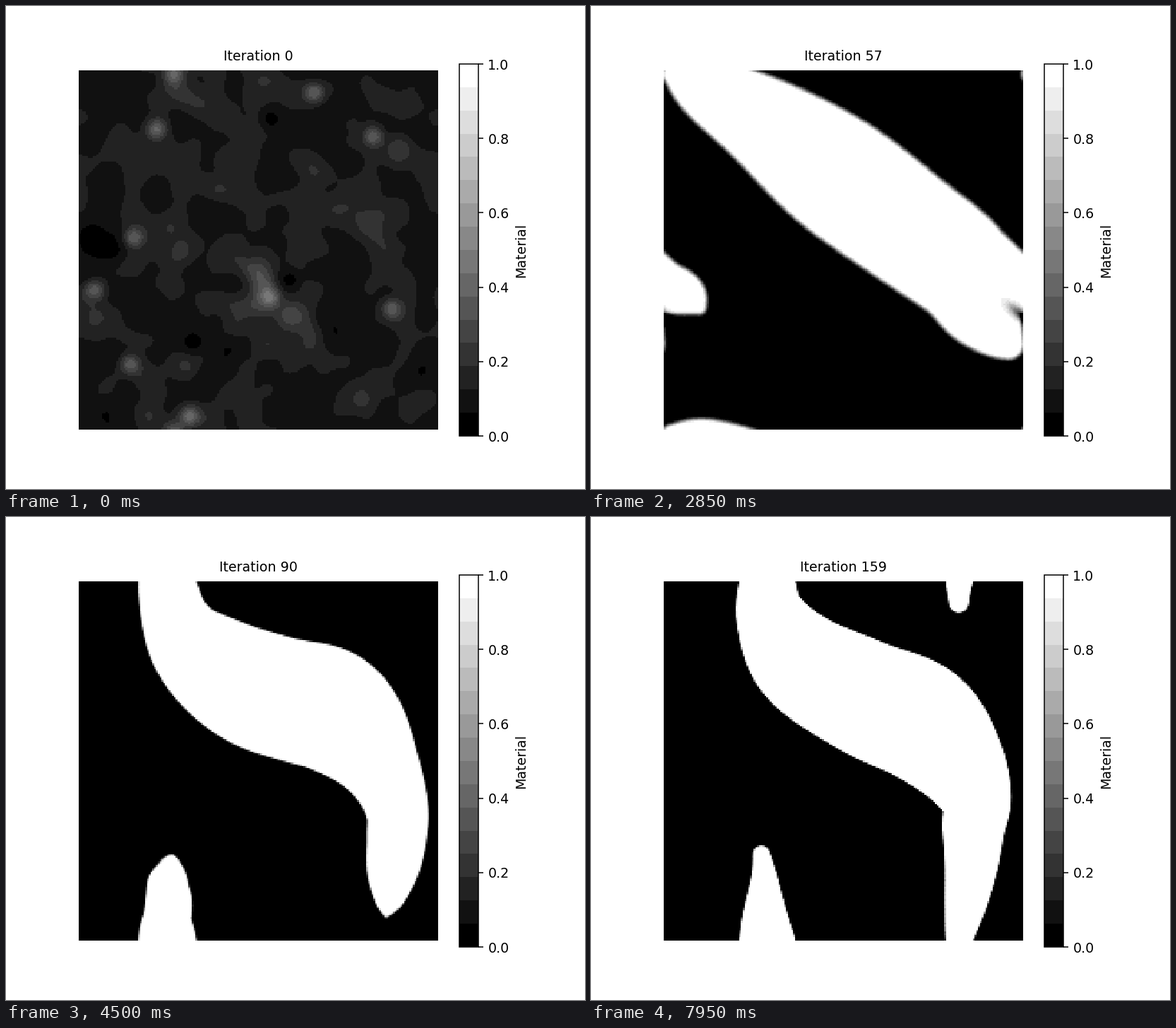
These frames come from a looping animation (820 px wide and 683 px high, 8 s). A matplotlib script:

```python
import matplotlib.pyplot as plt
import numpy as np
from matplotlib.animation import FuncAnimation

W, H, DPI = 820, 683, 820 / 6
FRAMES, STEP = 160, 50
N, SIDE = 200, 508              # grid cells, side of the periodic domain in px
X0, Y0 = 103, 91

axis = (np.arange(N) + 0.5) * SIDE / N
X, Y = np.meshgrid(X0 + axis, Y0 + axis)


def offset(x, y):
    """Shortest way from (x, y) to every cell on the torus."""
    half = SIDE / 2
    return (X - x + half) % SIDE - half, (Y - y + half) % SIDE - half


def spot(x, y, sx, sy):
    dx, dy = offset(x, y)
    return np.exp(-(dx / sx)**2 - (dy / sy)**2)


def spline(rows, n=8):
    """Open Catmull-Rom curve through rows of x, y, radius."""
    p = np.array(rows, float)
    p = np.vstack([p[0], p, p[-1]])
    p0, p1, p2, p3 = p[:-3], p[1:-2], p[2:-1], p[3:]
    parts = [0.5 * (2 * p1 + (p2 - p0) * u
                    + (2 * p0 - 5 * p1 + 4 * p2 - p3) * u**2
                    + (3 * p1 - p0 - 3 * p2 + p3) * u**3)
             for u in np.arange(n) / n]
    return np.vstack([np.stack(parts, axis=1).reshape(-1, 3), p[-1]])


def distance(*strokes):
    """Distance to strokes of varying width, negative inside."""
    best = np.full((N, N), 1e9)
    for rows in strokes:
        for x, y, r in spline(rows):
            best = np.minimum(best, np.hypot(*offset(x, y)) - r)
    return best


def solid(d, width):
    u = np.clip(0.5 - d / width, 0, 1)
    return u * u * (3 - 2 * u)


# random start: smooth noise with a few strong grains and gaps
rng = np.random.default_rng(7)
freq = np.fft.fftfreq(N)
blur = np.exp(-2 * (np.pi * 5.5)**2 * (freq[:, None]**2 + freq**2))
noise = np.fft.ifft2(np.fft.fft2(rng.normal(size=(N, N))) * blur).real
START = 0.128 * np.exp(0.26 * noise / noise.std())
for x, y in [(213, 175), (237, 97), (436, 124), (519, 185), (180, 328),
             (374, 413), (176, 507), (260, 580), (546, 428), (126, 402)]:
    START += 0.26 * spot(x, y, 14, 14)
for x, y in [(375, 160), (401, 388), (265, 475), (124, 332)]:
    START *= 1 - 0.8 * spot(x, y, 16, 16)

# faint band that grows out of the void; it crosses the sides and forks
band = distance(
    [(24, 136, 35), (60, 164, 36), (103, 185, 42), (150, 203, 41),
     (198, 196, 53), (255, 214, 46), (313, 254, 44), (376, 303, 49),
     (432, 329, 57), (500, 325, 79), (565, 355, 69), (625, 384, 65),
     (680, 412, 64), (735, 422, 58), (785, 455, 49), (807, 490, 28),
     (820, 508, 17)],
    [(605, 430, 45), (612, 475, 42), (613, 527, 41)])
FAINT = np.where(band > 0, 0.0625 * np.exp(-np.maximum(band, 0) / 30),
                 0.0625 + 0.115 * (1 - np.exp(np.minimum(band, 0) / 20)))
FAINT = np.clip(FAINT - 0.117 * spot(602, 411, 63, 46), 0, 1)

# solid shapes as strokes: x, y, radius
SLANT = [(114, 97, 13), (165, 120, 44), (245, 166, 65), (345, 238, 85),
         (444, 311, 83), (524, 372, 77), (548, 423, 58), (572, 458, 38),
         (590, 478, 22)]
SPUR = [(524, 372, 77), (600, 395, 42), (640, 407, 29), (661, 426, 10)]
HOOK = [(219, 8, 29), (226, 28, 35), (219, 58, 32), (217, 85, 41),
        (222, 118, 43), (252, 187, 56), (326, 236, 80), (410, 255, 87),
        (470, 275, 85), (530, 350, 51), (562, 410, 44), (562, 455, 42),
        (555, 495, 38), (549, 528, 20)]
JOINED = [(236, -26, 18), (239, -8, 20), (234, 19, 25), (235, 39, 31),
          (240, 91, 40), (249, 144, 49), (293, 200, 71), (375, 256, 83),
          (455, 280, 86), (514, 330, 68), (540, 400, 47), (542, 455, 42),
          (538, 510, 34), (537, 560, 24), (537, 604, 19)]
BODY = [(246, 55, 31), (249, 91, 39), (256, 145, 50), (300, 207, 71),
        (390, 257, 82), (465, 290, 84), (516, 342, 67), (544, 396, 50),
        (541, 440, 44), (538, 490, 38), (530, 545, 30)]
LATE = [(240, -28, 15), (242, 5, 20), *BODY, (523, 590, 21), (528, 630, 14)]
LAST = [(241, -31, 12), (245, 0, 18), *BODY, (521, 595, 20), (520, 630, 14)]

KEYS = [57, 76, 105, 128, 159]
WIDTHS = [10, 4, 2.5, 2.5, 2.5]
SHAPES = [distance(SLANT, SPUR)] + [distance(s) for s in (HOOK, JOINED, LATE, LAST)]

# slanted grey notch at the right side
dx, dy = offset(610, 438)
NOTCH = 0.7 * np.exp(-((dx * 0.8 + dy * 0.6) / 24)**2
                     - ((dy * 0.8 - dx * 0.6) / 8)**2)


def density(t):
    if t < 30:
        return START * np.exp(-t / 3)
    faint = FAINT * np.exp((t - 49) / 5)
    if t <= 49:
        return faint
    if t < KEYS[0]:
        k = (t - 49) / (KEYS[0] - 49)
        shape = solid((1 - k) * band + k * SHAPES[0], 30 - 20 * k)
        return (1 - k) * faint + k * (shape - k * NOTCH)
    i = min(np.searchsorted(KEYS, t, side="right"), len(KEYS) - 1) - 1
    k = (t - KEYS[i]) / (KEYS[i + 1] - KEYS[i])
    d = (1 - k) * SHAPES[i] + k * SHAPES[i + 1]
    fade = np.clip(1 - (t - KEYS[0]) / 6, 0, 1)
    return solid(d, np.interp(t, KEYS, WIDTHS)) - fade * NOTCH


def pixel_axes(x0, y0, x1, y1):
    return fig.add_axes([x0 / W, 1 - y1 / H, (x1 - x0) / W, (y1 - y0) / H])


fig = plt.figure(figsize=((W + 0.001) / DPI, (H + 0.001) / DPI), dpi=DPI)
ax = pixel_axes(X0, Y0, X0 + SIDE, Y0 + SIDE)
image = ax.imshow(START, cmap=plt.get_cmap("gray", 16), vmin=0, vmax=1,
                  interpolation="nearest", aspect="auto")
ax.axis("off")
fig.colorbar(image, cax=pixel_axes(642, 82, 669, 608), label="Material")
title = ax.set_title("Iteration 0", fontsize=10, pad=7.3)


def draw(t):
    image.set_data(density(t))
    title.set_text(f"Iteration {t}")
    return image, title


anim = FuncAnimation(fig, draw, frames=FRAMES, interval=STEP, repeat=True)
plt.show()
```
